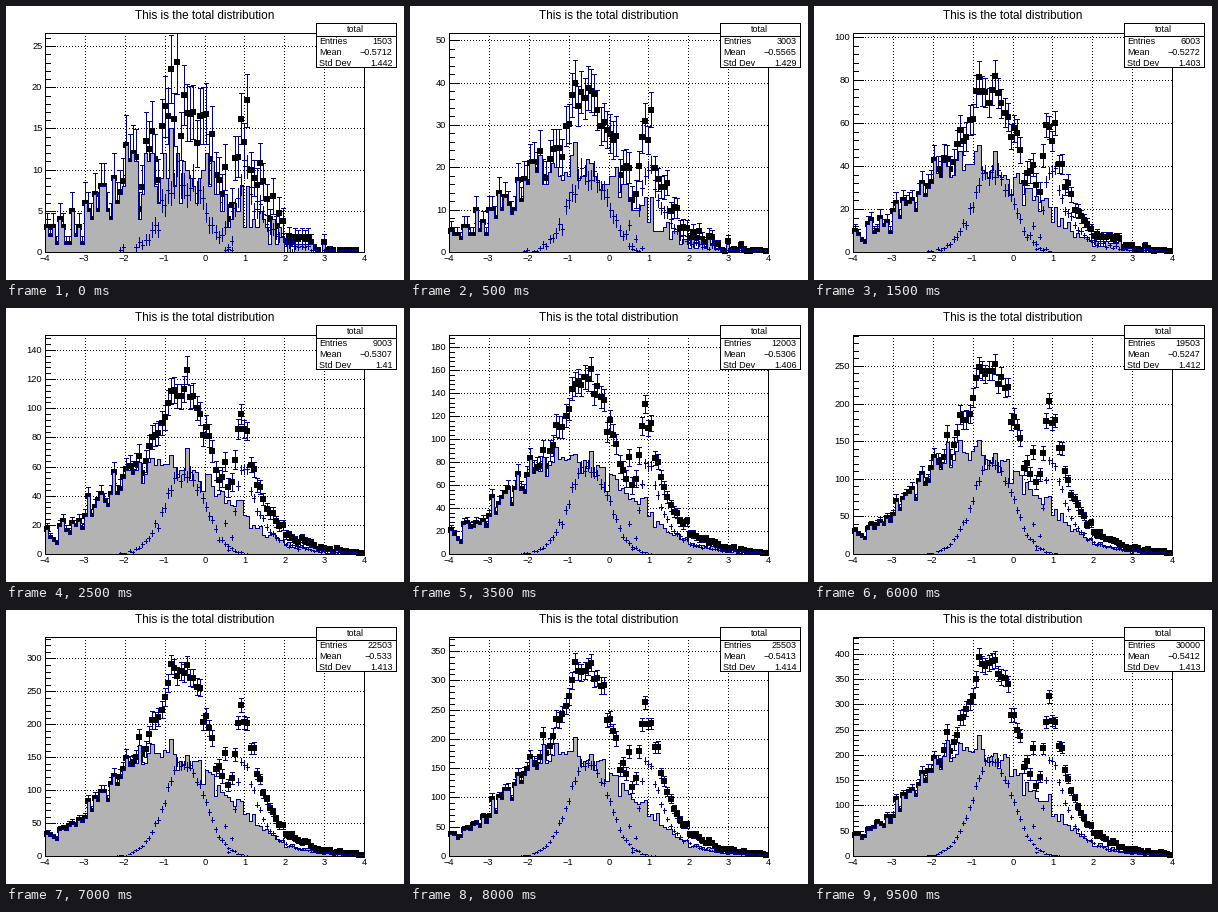
These frames come from a looping animation (398x274 px, 9.6 s). A matplotlib script:

```python
import numpy as np
import matplotlib.pyplot as plt
from matplotlib.animation import FuncAnimation
from matplotlib.collections import LineCollection
from matplotlib.patches import Rectangle

W, H = 398, 274
LEFT, RIGHT, TOP, BOTTOM = 39.8, 358.2, 27.4, 246.6
BINS, STEPS, TICK_MS = 100, 20, 100
PX = 0.72  # points per pixel at 100 dpi
NAVY, GRAY = "#000099", "#b3b3b3"
DOTS = (0.5, (1, 2))

# Axis range and statistics at key steps
KEY_STEPS = [0, 3, 5, 9, 12, 16, 19]
Y_MAX = [26.6, 101.9, 150.3, 231.6, 291.2, 374, 433]
MEAN = [-0.5712, -0.5272, -0.5307, -0.5305, -0.5247, -0.5413, -0.5412]
STD_DEV = [1.442, 1.403, 1.41, 1.403, 1.412, 1.414, 1.413]

plt.rcParams["font.family"] = "Liberation Sans"

edges = np.linspace(-4, 4, BINS + 1)
centers = (edges[:-1] + edges[1:]) / 2


def gauss(x, mu, sigma):
    return np.exp(-0.5 * ((x - mu) / sigma) ** 2) / (sigma * np.sqrt(2 * np.pi))


def landau(x, mu, sigma):
    lam = (x - mu) / sigma
    t = np.linspace(1e-6, 25, 12000)
    safe = np.maximum(lam, -3.5)[:, None]
    values = np.exp(-t * np.log(t) - safe * t) * np.sin(np.pi * t)
    pdf = values.sum(axis=1) * (t[1] - t[0]) / np.pi
    return np.where(lam > -3.5, np.maximum(pdf, 0), 0) / sigma


def fill_counts(rng, pdf, spread=0.75):
    """Cumulative bin counts per step, with a slightly calmed Poisson spread."""
    per_step = 10000 / STEPS * (edges[1] - edges[0]) * pdf
    drawn = rng.poisson(per_step, (STEPS, BINS)).cumsum(axis=0)
    expected = per_step * np.arange(1, STEPS + 1)[:, None]
    return np.maximum(np.round(expected + spread * (drawn - expected)), 0)


def build_histograms():
    rng = np.random.default_rng(7)
    main_pdf = gauss(centers, -1, 1.5)
    for x, excess in ((-1.64, 1.15), (-1.16, 1.1), (-0.84, 1.15), (0.92, 1.3)):
        main_pdf[np.argmin(abs(centers - x))] *= excess
    return (fill_counts(rng, main_pdf),
            fill_counts(rng, gauss(centers, -0.5, 0.5)),
            fill_counts(rng, landau(centers, 1, 0.15)))


main_hist, count1, count2 = build_histograms()

fig = plt.figure(figsize=(W / 100, H / 100), dpi=100, facecolor="white")
ax = fig.add_axes([0, 0, 1, 1])


def to_x(x):
    return LEFT + (np.asarray(x) + 4) * (RIGHT - LEFT) / 8


def label(x, y, text, size, ha="center", va="center"):
    ax.text(x, y, text.replace("-", "\u2212"), fontsize=size * PX,
            ha=ha, va=va, color="black", zorder=10)


def segments(x0, y0, x1, y1, color, zorder, style="solid"):
    """Straight lines on whole pixels; the arguments broadcast."""
    points = np.floor(np.broadcast_arrays(x0, y0, x1, y1))
    lines = points.reshape(4, -1).T.reshape(-1, 2, 2)
    ax.add_collection(LineCollection(
        lines, colors=color, linewidths=PX, linestyles=style,
        antialiaseds=style != "solid", zorder=zorder))


def box(x0, y0, x1, y1, fill, zorder):
    x0, y0, x1, y1 = np.floor([x0, y0, x1, y1])
    ax.add_patch(Rectangle((x0, y0), x1 - x0, y1 - y0, facecolor=fill,
                           edgecolor="black", linewidth=PX,
                           antialiased=False, zorder=zorder))


def major_step(y_max):
    raw = y_max / 10
    power = 10 ** np.floor(np.log10(raw))
    for limit, step in ((1, 1), (2.5, 2), (5, 5)):
        if raw / power <= limit:
            return step * power
    return 10 * power


def draw_axes(y_max, to_y):
    step = major_step(y_max)
    y_major = np.arange(0, y_max, step)
    y_minor = np.arange(0, y_max, step / 5)
    x_major = np.arange(-4, 5)
    x_minor = np.linspace(-4, 4, 41)
    grid_x, grid_y = to_x(x_major[1:-1]), to_y(y_major[1:])
    segments(grid_x, BOTTOM, grid_x, TOP, "black", 1, DOTS)
    segments(LEFT, grid_y, RIGHT, grid_y, "black", 1, DOTS)
    for ticks, size in ((x_major, 6.6), (x_minor, 3.3)):
        segments(to_x(ticks), BOTTOM, to_x(ticks), BOTTOM - size, "black", 2)
    for ticks, size in ((y_major, 9.5), (y_minor, 4.8)):
        segments(LEFT, to_y(ticks), LEFT + size, to_y(ticks), "black", 2)
    box(LEFT, TOP, RIGHT, BOTTOM, "none", 8)
    for x in x_major:
        label(to_x(x) - (1.5 if x < 0 else 0), 252.3, str(x), 9.3)
    for y in y_major:
        label(36.3, to_y(y), f"{y:.0f}", 9.3, ha="right")


def draw_signal(counts, weight, to_y):
    used = counts > 0
    value, error = weight * counts[used], weight * np.sqrt(counts[used])
    x, y = to_x(centers[used]), to_y(value)
    segments(x, to_y(value - error), x, to_y(value + error), NAVY, 7)
    segments(to_x(edges[:-1][used]), y, to_x(edges[1:][used]), y, NAVY, 7)


def draw_total(total, error, to_y):
    used = total > 0
    x, total, error = to_x(centers[used]), total[used], error[used]
    low = to_y(np.maximum(total - error, 0))
    high = np.maximum(to_y(total + error), TOP)
    segments(x, low, x, high, NAVY, 3)
    for end in (low, high):
        inside = end < BOTTOM - 0.1
        segments(x[inside] - 2, end[inside], x[inside] + 2, end[inside], NAVY, 3)
    ax.plot(np.floor(x), np.floor(to_y(total)), "s", color="black", ms=6 * PX,
            mew=0, antialiased=False, zorder=4)


def draw_histograms(step, to_y):
    main, n1, n2 = main_hist[step], count1[step], count2[step]
    draw_total(main + 0.3 * n1 + 0.2 * n2,
               np.sqrt(main + 0.09 * n1 + 0.04 * n2), to_y)
    outline_x = np.floor(np.repeat(to_x(edges), 2)[1:-1])
    outline_y = np.floor(np.repeat(to_y(main), 2))
    ax.fill_between(outline_x, outline_y, np.floor(BOTTOM), color=GRAY,
                    linewidth=0, antialiased=False, zorder=5)
    ax.plot(outline_x, outline_y, color=NAVY, lw=PX, antialiased=False,
            solid_joinstyle="miter", zorder=6)
    draw_signal(n1, 0.3, to_y)
    draw_signal(n2, 0.2, to_y)


def draw_stats(step):
    entries = min(1503 + 1500 * step, 30000)
    mean = np.interp(step, KEY_STEPS, MEAN)
    std_dev = np.interp(step, KEY_STEPS, STD_DEV)
    box(310, 17, 390, 61, "white", 9)
    segments(310, 30, 390, 30, "black", 9.5)
    label(349.5, 24, "total", 9)
    rows = (("Entries", f"{entries}"), ("Mean", f"{mean:.4g}"),
            ("Std Dev", f"{std_dev:.4g}"))
    for i, (name, value) in enumerate(rows):
        y = 38.2 + 10.8 * i
        label(313.3, y, name, 9, ha="left", va="baseline")
        label(386.5, y, value, 9, ha="right", va="baseline")


def draw(tick):
    step = min(tick // 5, STEPS - 1)
    y_max = np.interp(step, KEY_STEPS, Y_MAX)

    def to_y(value):
        return BOTTOM - np.asarray(value) * (BOTTOM - TOP) / y_max

    ax.clear()
    ax.set_xlim(0, W)
    ax.set_ylim(H, 0)
    ax.axis("off")
    draw_axes(y_max, to_y)
    draw_histograms(step, to_y)
    draw_stats(step)
    label(198.3, 10, "This is the total distribution", 11.75)
    return []


anim = FuncAnimation(fig, draw, frames=96, interval=TICK_MS,
                     init_func=lambda: [], repeat=True, repeat_delay=0)
plt.show()
```
